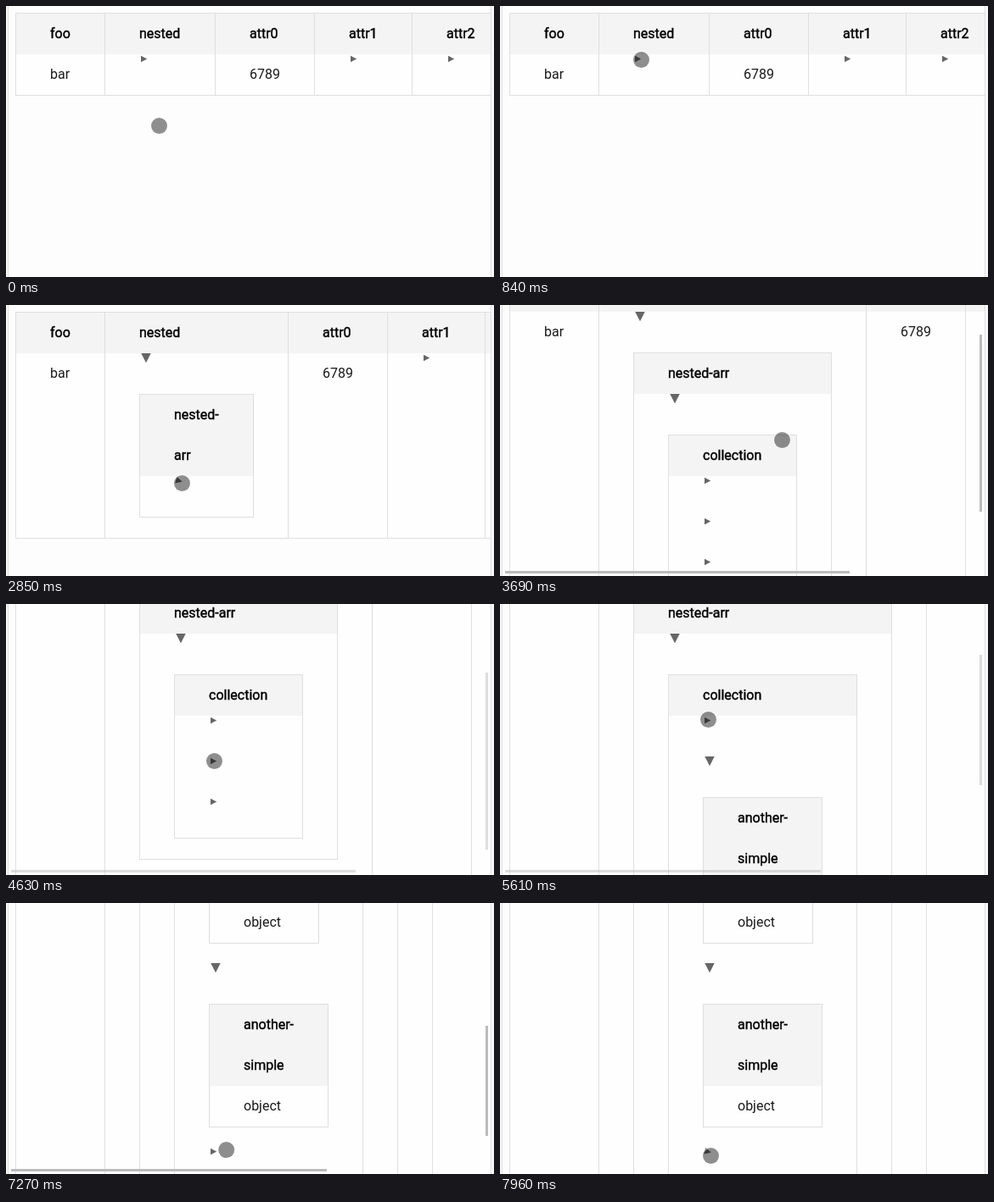
Animation, 575 px wide and 320 px high, one loop 8 s. Source, as an HTML page:

```html
<!DOCTYPE html>
<html>
<head>
<meta charset="utf-8">
<style>
html, body { margin: 0; width: 575px; height: 320px; overflow: hidden; background: #f8f8f8; }
svg { display: block; }
text { font: 400 16px Roboto, sans-serif; fill: #1a1a1a; }
.head { fill: #000; stroke: #000; stroke-width: .4px; }
#cursor { fill: rgba(0, 0, 0, .44); stroke: rgba(255, 255, 255, .5); stroke-width: 2px; paint-order: stroke; }
</style>
</head>
<body>
<svg width="575" height="320" viewBox="0 0 575 320">
  <defs><clipPath id="pane"><rect x="3" width="568" height="320"/></clipPath></defs>
  <rect x="2" width="570" height="320" fill="#dfdfdf"/>
  <rect x="3" width="568" height="320" fill="#fdfdfd"/>
  <g clip-path="url(#pane)"><g id="sheet"></g></g>
  <g id="bars" fill="#bbb">
    <rect id="barX" x="6" y="314" height="3"/>
    <rect id="barY" x="565" width="3"/>
  </g>
  <circle id="cursor" r="9.5"/>
</svg>
<script>
const $ = id => document.getElementById(id);
const set = (id, attrs) => { for (const k in attrs) $(id).setAttribute(k, attrs[k]); };
const LOOP = 8000, OPEN_DELAY = 120, LINE = 48;

const clamp = v => Math.max(0, Math.min(1, v));
const glide = (t, start, end) => 1 - (1 - clamp((t - start) / (end - start))) ** 3;

// Pointer moves: start, end, then where it stops
const moves = [[100, 250, 234, 174], [250, 800, 166, 63], [1900, 2260, 207, 210],
  [3330, 3660, 332, 159], [4000, 4500, 245, 185], [5560, 5610, 245, 136],
  [6430, 6600, 450, 173], [6900, 7500, 248, 298]];

function pointer(t) {
  let x = 180, y = 141;
  for (const [start, end, toX, toY] of moves) {
    const p = glide(t, start, end);
    x += (toX - x) * p;
    y += (toY - y) * p;
  }
  return [x + .5, y + .5];
}

const scrollAt = t => Math.round(119 * glide(t, 3630, 4010) + 230 * glide(t, 6440, 6750));

// Scrollbars appear at half strength and fade out before the end
const flash = (t, start, end) => t < start ? 0 : Math.min(clamp(.5 + (t - start) / 300), clamp((end - t) / 300));
const barsAt = t => Math.max(flash(t, 1990, 2290), flash(t, 3400, 4780), flash(t, 5610, 5900), flash(t, 6450, 7830));

const rect = (x, y, w, h, fill) => `<rect x="${x}" y="${y}" width="${w}" height="${h}" fill="${fill}"/>`;
const text = (x, y, s, cls = '') => `<text x="${x}" y="${y}" class="${cls}">${s}</text>`;

// Disclosure marker in a row starting at y; p runs from closed to open
const marker = (x, y, p = 0) =>
  `<path d="M-3.5-3.7 3.7 0-3.5 3.7z" fill="#666" transform="translate(${x + 5.5 + 2.5 * p} ${y + 5.5}) rotate(${90 * p}) scale(${1 + .55 * p})"/>`;

// Bordered table with a shaded header of one or more lines
function table(x, y, right, bottom, lines) {
  const w = right - x - 1;
  return rect(x, y, w + 2, bottom - y + 1, '#dfdfdf') +
    rect(x + 1, y + 1, w, bottom - y - 1, '#fefefe') +
    rect(x + 1, y + 1, w, LINE * lines.length, '#f4f4f4') +
    lines.map((s, i) => text(x + 41, y + 30 + LINE * i, s, 'head')).join('');
}

function objectTable(y, right, lines) {
  const bottom = y + 1 + LINE * (lines.length + 1);
  return table(239, y, right, bottom, lines) + text(280, bottom - 19, 'object');
}

function sheet(t) {
  const turn = start => t < start ? 0 : t < start + OPEN_DELAY ? .15 : 1;
  const isOpen = p => p === 1;
  const nested = turn(1560), arr = turn(2850), second = turn(5060), first = turn(6040), third = turn(7960);
  const right = isOpen(second) ? 502 : isOpen(arr) ? 431 : isOpen(nested) ? 332 : 246;

  const row1 = 251;
  const row2 = row1 + (isOpen(first) ? 169 : LINE);
  const row3 = row2 + (isOpen(second) ? 217 : LINE);
  const listEnd = row3 + LINE;
  const bottom = isOpen(arr) ? listEnd + 50 : isOpen(nested) ? 275 : 105;

  let s = table(11, 8, 800, bottom, ['foo']);
  for (const x of [116, right, right + 117, right + 232]) s += rect(x, 8, 1, bottom - 8, '#dfdfdf');
  s += text(157, 38, 'nested', 'head') + text(52, 86, 'bar') + text(right + 41, 86, '6789');
  [41, 158, 273].forEach((dx, i) => s += text(right + dx, 38, 'attr' + i, 'head'));
  s += marker(157, 57, nested) + marker(right + 158, 57) + marker(right + 273, 57);

  if (isOpen(arr)) {
    s += table(157, 105, right - 41, listEnd + 25, ['nested-arr']) + marker(198, 154, arr);
    s += table(198, 202, right - 82, listEnd, ['collection']);
    s += marker(239, row1, first) + marker(239, row2, second) + marker(239, row3, third);
    if (isOpen(first)) s += objectTable(row1 + LINE, 368, ['simple']);
    if (isOpen(second)) s += objectTable(row2 + LINE, 379, ['another-', 'simple']);
  } else if (isOpen(nested)) {
    s += table(157, 105, right - 41, 250, ['nested-', 'arr']) + marker(198, 202, arr);
  }
  return { s, width: right + 341, height: bottom + 32 };
}

let last = '';
function frame(now) {
  const t = now % LOOP, scroll = scrollAt(t), [cx, cy] = pointer(t);
  const { s, width, height } = sheet(t);
  if (s !== last) $('sheet').innerHTML = last = s;
  set('sheet', { transform: `translate(0 ${-scroll})` });
  set('cursor', { cx, cy });
  set('bars', { opacity: barsAt(t) });
  set('barX', { width: Math.round(560 * 560 / width) });
  set('barY', {
    y: Math.round(3 + scroll * 311 / height),
    height: height > 320 ? Math.round(320 * 311 / height) : 0
  });
  requestAnimationFrame(frame);
}
requestAnimationFrame(frame);
</script>
</body>
</html>
```
